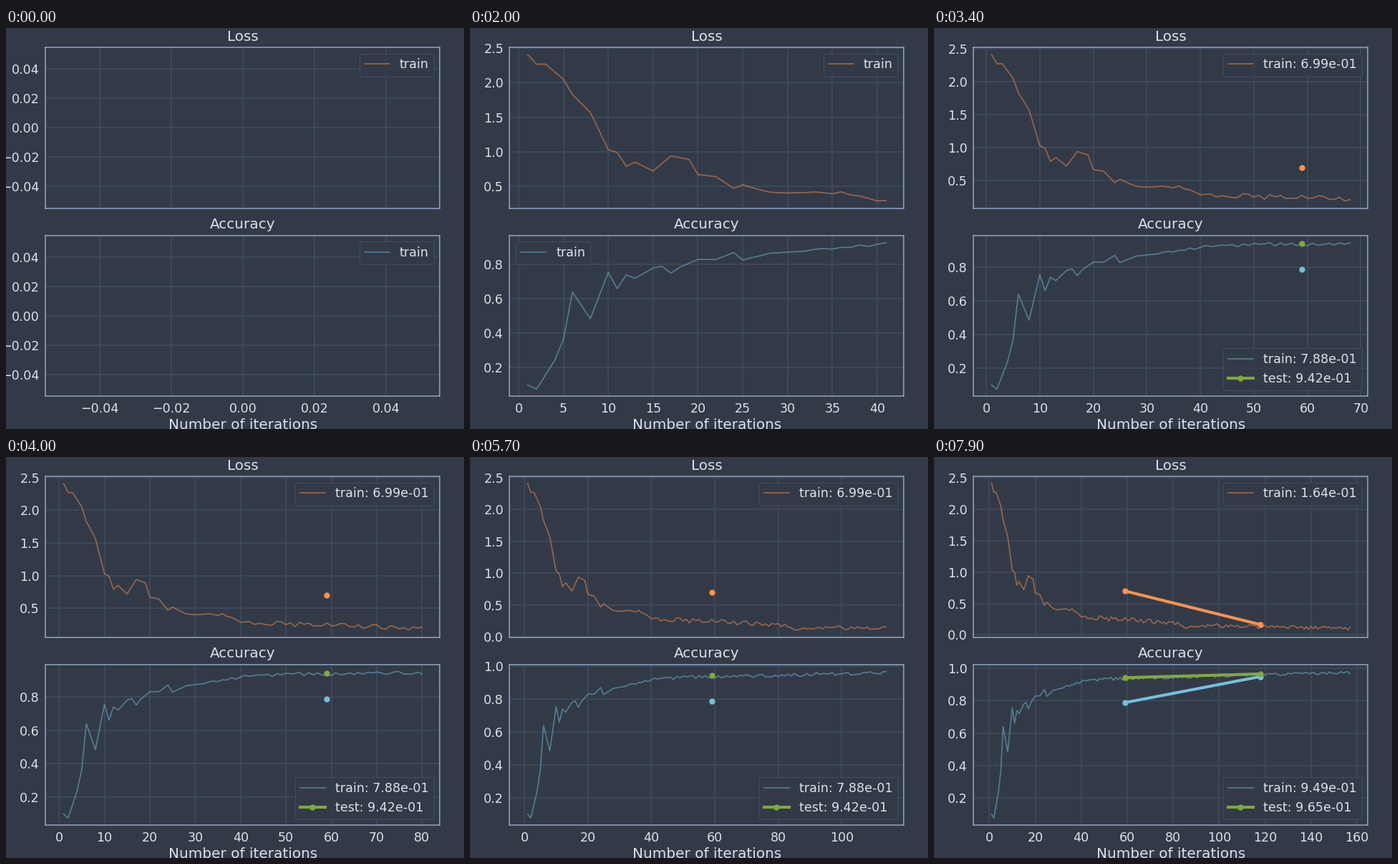
Animation, 640 px wide and 560 px high, one loop 8 s. Source, as a matplotlib script:

```python
import numpy as np
import matplotlib.pyplot as plt
from matplotlib.animation import FuncAnimation

W, H, DPI = 640, 560, 80
FRAMES, INTERVAL = 80, 100
EPOCH = 59  # iterations per epoch
LAST = 157

BG, TEXT, EDGE, GRID = "#323a48", "#dbe1ea", "#92a2bd", "#404c5d"
ORANGE, CYAN, GREEN = "#ff914d", "#77bedb", "#83a83b"

plt.rcParams.update({
    "font.family": "DejaVu Sans",
    "text.color": TEXT,
    "axes.labelcolor": TEXT,
    "axes.titlesize": 18,
    "axes.titlepad": 8.3,
    "axes.labelsize": 18,
    "axes.facecolor": BG,
    "axes.edgecolor": EDGE,
    "axes.linewidth": 1.4,
    "axes.grid": True,
    "axes.axisbelow": True,
    "grid.color": GRID,
    "grid.linewidth": 1.4,
    "legend.fontsize": 15.75,
    "legend.facecolor": BG,
    "legend.edgecolor": "#465163",
    "legend.framealpha": 0.8,
})

# Training curves: straight runs between turning points, plus batch noise.
LOSS_KEYS = [(1, 2.41), (2, 2.27), (3, 2.27), (5, 2.05), (6, 1.83), (8, 1.57),
             (10, 1.03), (11, 0.99), (12, 0.79), (13, 0.85), (15, 0.72),
             (17, 0.94), (19, 0.89), (20, 0.67), (22, 0.64), (24, 0.47),
             (25, 0.52), (28, 0.41), (36, 0.4), (41, 0.28), (59, 0.24),
             (82, 0.19), (86, 0.1), (89, 0.155), (LAST, 0.1)]
ACC_KEYS = [(1, 0.1), (2, 0.076), (4, 0.24), (5, 0.365), (6, 0.64),
            (8, 0.485), (10, 0.755), (11, 0.66), (12, 0.74), (13, 0.72),
            (15, 0.78), (16, 0.79), (17, 0.75), (18, 0.785), (20, 0.83),
            (22, 0.83), (24, 0.87), (25, 0.827), (28, 0.865), (41, 0.92),
            (54, 0.935), (68, 0.935), (94, 0.953), (LAST, 0.973)]

rng = np.random.default_rng(4)
steps = np.arange(1, LAST + 1)
spread = np.interp(steps, [25, 45, 60, LAST], [0, 0.04, 0.04, 0.025])


def curve(keys, scale):
    x, y = zip(*keys)
    noise = rng.uniform(-1, 1, LAST)
    return np.interp(steps, x, y) + scale * spread * noise


loss = curve(LOSS_KEYS, 1)
acc = curve(ACC_KEYS, 0.3)

# Epoch summaries
epoch_x = [EPOCH, 2 * EPOCH]
epoch_loss = [0.699, 0.164]
epoch_acc = [0.788, 0.949]
epoch_test = [0.942, 0.965]

fig = plt.figure(figsize=(W / DPI, H / DPI), dpi=DPI, facecolor=BG)


def add_axes(top, bottom, title, **kw):
    rect = [55.45 / W, 1 - bottom / H, 551 / W, (bottom - top) / H]
    ax = fig.add_axes(rect, **kw)
    ax.set_title(title)
    ax.tick_params(length=0, pad=7.5, labelsize=15.75, labelcolor=TEXT)
    return ax


def thin_line(ax, color):
    return ax.plot([], [], color=color, alpha=0.5, lw=1.5)[0]


def thick_line(ax, color):
    return ax.plot([], [], color=color, lw=3.7, marker="o", ms=7.5, mew=0)[0]


ax_loss = add_axes(26.75, 251.75, "Loss")
ax_acc = add_axes(289.55, 514.45, "Accuracy", sharex=ax_loss)
ax_loss.tick_params(labelbottom=False)
ax_acc.set_xlabel("Number of iterations")

loss_line = thin_line(ax_loss, ORANGE)
loss_epochs = thick_line(ax_loss, ORANGE)
acc_line = thin_line(ax_acc, CYAN)
acc_epochs = thick_line(ax_acc, CYAN)
test_epochs = thick_line(ax_acc, GREEN)


def label(name, values):
    return f"{name}: {values[-1]:.2e}" if values else name


def draw(k):
    # Two events per frame; closing an epoch takes one event.
    done = k // 30
    n = 2 * k + 1 - done if k else 0

    loss_line.set_data(steps[:n], loss[:n])
    acc_line.set_data(steps[:n], acc[:n])
    for line, values in ((loss_epochs, epoch_loss), (acc_epochs, epoch_acc),
                         (test_epochs, epoch_test)):
        line.set_data(epoch_x[:done], values[:done])

    for ax in (ax_loss, ax_acc):
        ax.relim()
    for ax in (ax_loss, ax_acc):
        ax.autoscale_view()

    ax_loss.legend([loss_line], [label("train", epoch_loss[:done])], loc="best")
    handles, names = [acc_line], [label("train", epoch_acc[:done])]
    if done:
        handles.append(test_epochs)
        names.append(label("test", epoch_test[:done]))
    ax_acc.legend(handles, names, loc="best")
    return []


anim = FuncAnimation(fig, draw, frames=FRAMES, interval=INTERVAL, repeat=True)
plt.show()
```
